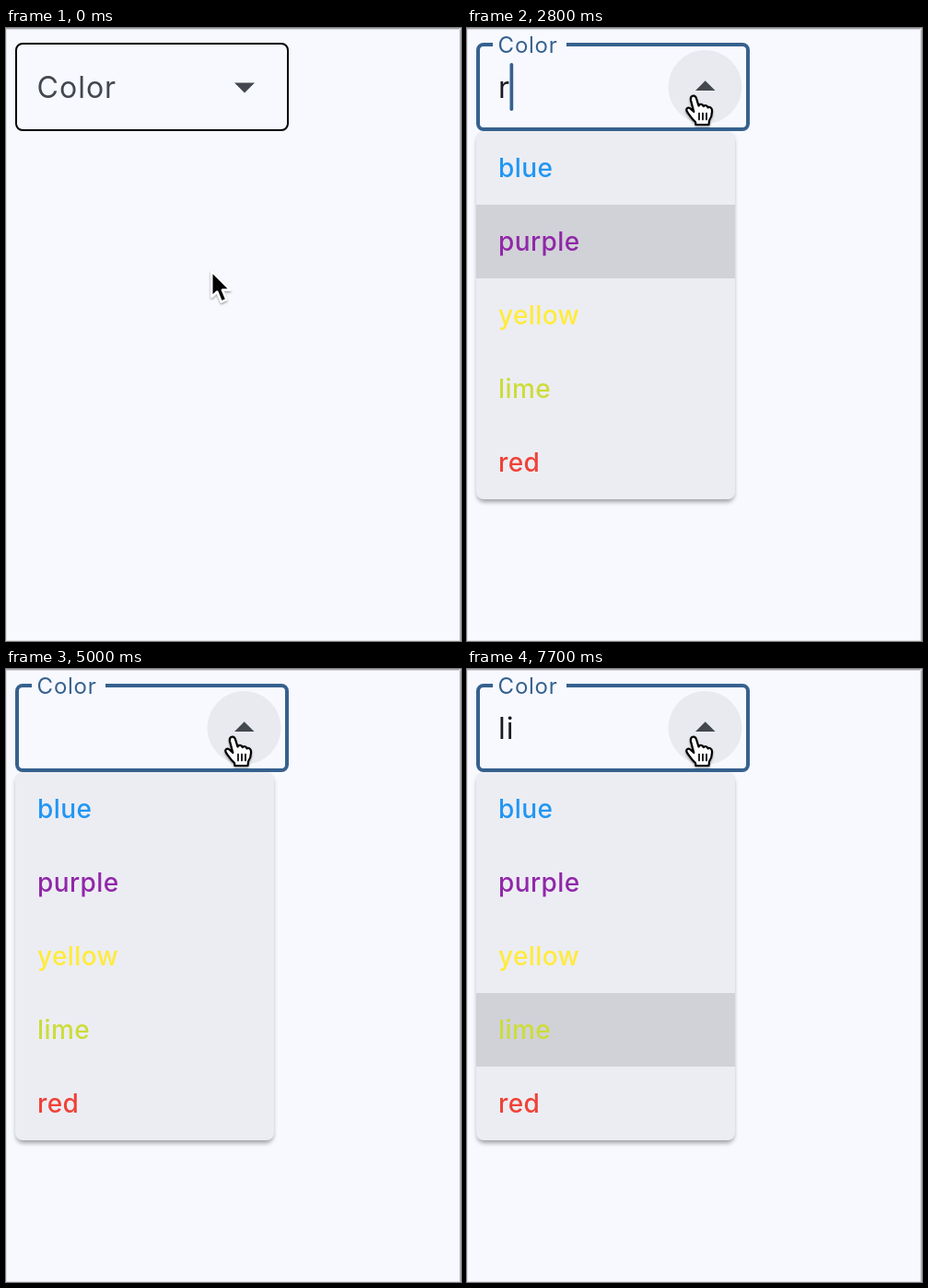
Recreate the animation shown at these times as an HTML page. Size 494 px wide and 666 px high, loop 8000 ms.

```html
<!DOCTYPE html>
<html lang="en">
<head>
<meta charset="utf-8">
<title>Color menu</title>
<style>
html, body { margin: 0; width: 100%; height: 100%; overflow: hidden; background: #f7f9ff; }
svg { display: block; width: 494px; height: 666px; }
text { font-family: Inter, Roboto, sans-serif; }
.big { font-size: 32px; letter-spacing: 1px; }
.item { font-size: 28px; font-weight: 500; letter-spacing: .4px; }
</style>
</head>
<body>
<svg viewBox="0 0 494 666">
  <defs>
    <filter id="soft" x="-10%" y="-10%" width="120%" height="120%"><feGaussianBlur stdDeviation="2.4"/></filter>
    <filter id="drop" x="-40%" y="-40%" width="180%" height="180%">
      <feDropShadow dx="0" dy="1.5" stdDeviation="1.3" flood-opacity=".4"/>
    </filter>
    <clipPath id="round"><rect x="10" y="112" width="281" height="400" rx="8"/></clipPath>
    <clipPath id="disc"><circle cx="258.5" cy="64" r="40"/></clipPath>
  </defs>
  <rect width="494" height="666" fill="#f7f9ff"/>
  <path d="M.5 0V666M0 665.5H494" stroke="#dfe1e6"/>
  <path d="M0 .5H494M493.5 0V666" stroke="#a6a8ad"/>
  <path d="M0 1.5H494M492.5 0V666" stroke="#d6d8de"/>

  <path id="frame" fill="none"/>
  <circle id="hover" cx="258.5" cy="64" r="40" fill="#e8eaef"/>
  <g clip-path="url(#disc)"><circle id="ripple" fill="#dfe3ea"/></g>
  <path id="icon" fill="#43474e"/>
  <text id="label" class="big">Color</text>
  <text id="typed" class="big" x="34" y="76" fill="#191c20"></text>
  <rect id="caret" y="38" width="3.7" height="52" rx="1.8" fill="#36618e"/>

  <g id="menu">
    <rect x="11" y="116" width="279" height="399" rx="8" opacity=".36" filter="url(#soft)"/>
    <rect x="10" y="112" width="281" height="400" rx="8" fill="#ecedf3"/>
    <g clip-path="url(#round)"><rect id="mark" x="10" width="281" height="80" fill="#d1d2d7"/></g>
  </g>

  <g id="arrow" filter="url(#drop)">
    <path d="M0 0V27.5L6 22L10.5 33L16 30.5L11.5 20H20Z" fill="#000" stroke="#fff" stroke-width="2.4" stroke-linejoin="round"/>
  </g>
  <g id="hand" filter="url(#drop)">
    <path d="M-3 5C-4-.5 1.5-1.5 3 3L5.5 11C6.5 8.5 10 8.8 10.8 11.6C12 9.8 15 10.6 15.6 13C17.2 11.6 20 13 20 16C20.3 21 19 24 17 27L16.5 31.5H2.5L2 28.5C-1.5 25.5-4.5 21-7 17.5C-9 14-6 11.6-3 14.4L.3 17.5Z" fill="#fff" stroke="#000" stroke-width="2.2" stroke-linejoin="round"/>
    <path d="M6 19V26M10 19V26M14 19V26" stroke="#000" stroke-width="1.7" stroke-linecap="round"/>
  </g>
</svg>
<script>
const $ = id => document.getElementById(id);
const set = (id, attrs) => { for (const k in attrs) $(id).setAttribute(k, attrs[k]); };
const show = (id, on) => set(id, { visibility: on ? 'visible' : 'hidden' });
const clamp = v => Math.min(1, Math.max(0, v));
const mix = (a, b, p) => a + (b - a) * p;
const smooth = p => p * p * (3 - 2 * p);
const tint = (a, b, p) => `rgb(${a.map((v, i) => Math.round(mix(v, b[i], p)))})`;

const LOOP = 8000, STEP = 100, OPEN = 800;
const BLUE = [54, 97, 142], GREY = [67, 71, 78], BLACK = [0, 0, 0];
const items = [['blue', '#2196f3'], ['purple', '#9027a8'], ['yellow', '#ffeb3b'],
               ['lime', '#cddc39'], ['red', '#f04136']];
// time, field content, caret position
const edits = [[OPEN, '', 34.2], [2600, 'r', 46.5], [3000, 're', 65.2], [4400, 'r', 46.5],
               [4500, '', 34.2], [5400, 'l', 42.3], [6200, 'li', 51.7]];

items.forEach(([name, fill], i) => {
  const el = document.createElementNS('http://www.w3.org/2000/svg', 'text');
  el.textContent = name;
  el.setAttribute('class', 'item');
  el.setAttribute('x', 34);
  el.setAttribute('y', 162 + 80 * i);
  el.setAttribute('fill', fill);
  $('menu').append(el);
});

// cubic-bezier(.4, 0, .2, 1)
function ease(x) {
  let lo = 0, hi = 1;
  for (let i = 0; i < 20; i++) {
    const s = (lo + hi) / 2, r = 1 - s;
    if (1.2 * r * r * s + .6 * r * s * s + s ** 3 < x) lo = s; else hi = s;
  }
  return lo * lo * (3 - 2 * lo);
}

function outline(w, gap) {
  const l = 10 + w / 2, t = 16 + w / 2, r = 307 - w / 2, b = 112 - w / 2, q = 8 - w / 2;
  const arc = (x, y) => `A${q} ${q} 0 0 1 ${x} ${y}`;
  return `M${28 + gap} ${t}H${r - q}${arc(r, t + q)}V${b - q}${arc(r - q, b)}` +
         `H${l + q}${arc(l, b - q)}V${t + q}${arc(l + q, t)}H28`;
}

function pointer(t) {
  const p = smooth(clamp(t / 400));
  const x = mix(223.3, 246, p), y = mix(264.5, 73.5, p), over = y < 104;
  set('arrow', { transform: `translate(${x} ${y})` });
  set('hand', { transform: `translate(${x} ${y})` });
  show('arrow', !over);
  show('hand', over);
  show('hover', over);
}

function field(t, open) {
  const p = ease(clamp((t - 765) / 167));
  set('frame', { d: outline(mix(2, 4, p), 80 * p), stroke: tint(BLACK, BLUE, p), 'stroke-width': mix(2, 4, p) });
  set('label', {
    transform: `translate(33.6 ${mix(76, 27, p)}) scale(${mix(1, .75, p)})`,
    fill: tint(GREY, BLUE, p)
  });
  set('icon', { d: open ? 'M248 68H269.5L258.7 57.3Z' : 'M248 59.5H270L259 70.5Z' });

  const grow = clamp((t - 700) / 400), g = 1 - (1 - grow) ** 2;
  set('ripple', {
    cx: mix(246, 258.5, g), cy: mix(78, 64, g), r: mix(14, 40, g),
    opacity: open ? 1 - clamp((t - 900) / 500) : 0
  });
}

function draw(ms) {
  const t = Math.floor(ms % LOOP / STEP) * STEP, open = t >= OPEN;
  pointer(t);
  field(t, open);
  show('menu', open);

  const [at, text, x] = edits.filter(e => e[0] <= t).pop() || [0, '', 0];
  if ($('typed').textContent !== text) $('typed').textContent = text;
  set('caret', { x });
  show('caret', open && Math.floor((t - at) / 500) % 2 === 0);

  // the first entry containing the typed text is marked
  const hit = text ? items.findIndex(([name]) => name.includes(text)) : -1;
  set('mark', { y: 112 + 80 * Math.max(hit, 0), opacity: hit < 0 ? 0 : 1 });
}

const start = performance.now();
function tick() {
  draw(performance.now() - start);
  requestAnimationFrame(tick);
}
tick();
</script>
</body>
</html>
```
